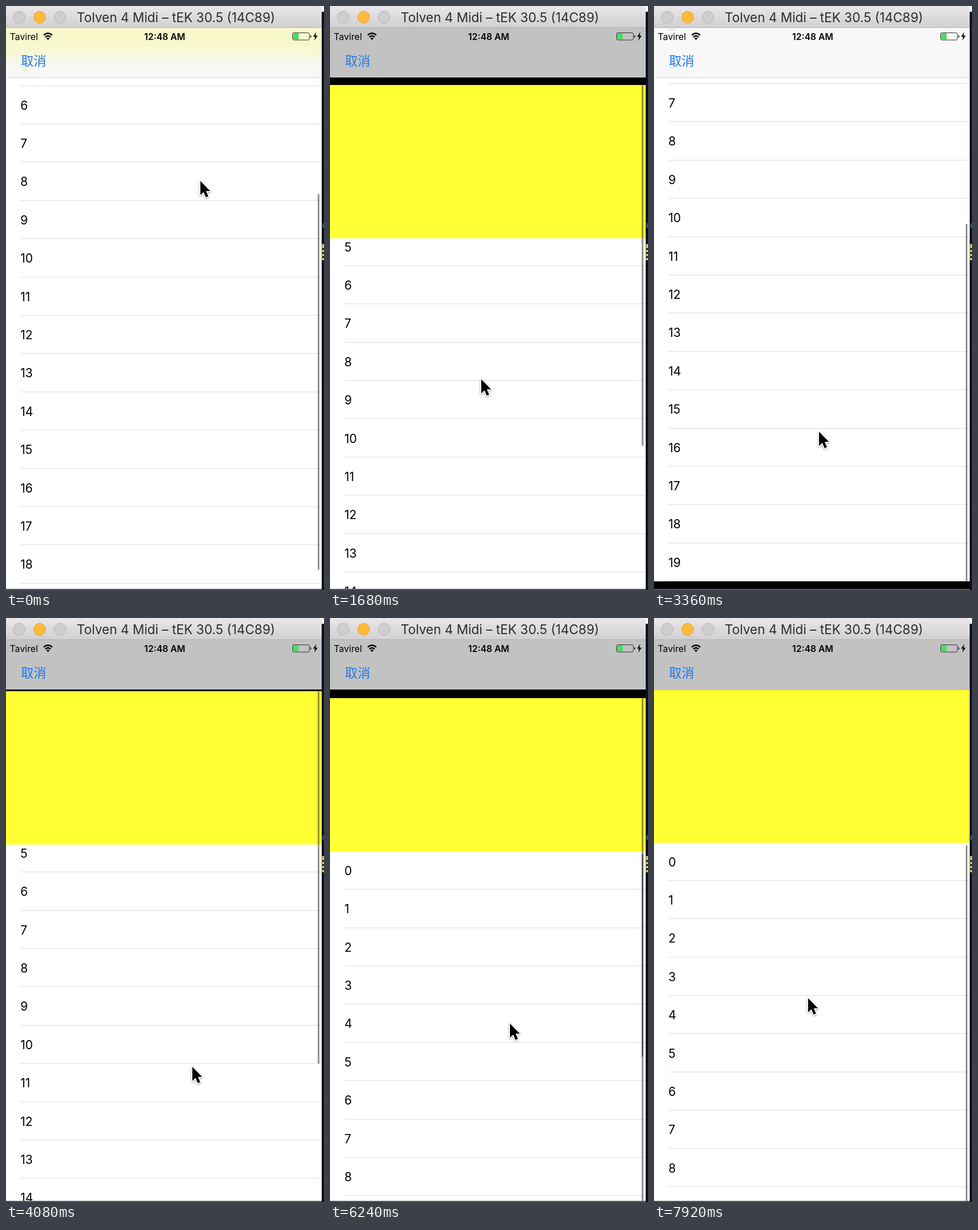
Write an HTML page that moves like this. It is 553 by 1013 pixels and loops after 8000 ms.

```html
<!DOCTYPE html>
<html lang="zh">
<head>
<meta charset="utf-8">
<title>Nested scrolling list</title>
<style>
  html, body { margin: 0; width: 553px; height: 1013px; overflow: hidden; background: #0c101c; }
  body { position: relative; font-family: Inter, "Open Sans", sans-serif; color: #000; }
  div, svg { position: absolute; }
  #screen { left: 0; top: 38px; width: 549px; height: 973px; overflow: hidden; background: #000; }
  #world { left: 0; width: 549px; }
  #banner { left: 0; top: 0; width: 549px; height: 265.5px; background: #ffff33; }
  #list { left: 0; top: 265.5px; width: 549px; overflow: hidden; background: #fff; }
  #rows { left: 0; width: 549px; }
  .row { left: 25px; width: 524px; height: 66.4px; line-height: 68px; font-size: 21px; }
  .row::after { content: ""; position: absolute; left: 0; right: 0; bottom: 0; height: 1px; background: #dedede; }
  .bar { left: 541.5px; width: 3px; border-radius: 2px; background: rgba(0, 0, 0, .42); }
  #nav { left: 0; top: 0; width: 549px; height: 86px; background: rgba(246, 246, 246, .788);
    -webkit-backdrop-filter: blur(16px); backdrop-filter: blur(16px); }
  #hair { left: 0; top: 86px; width: 549px; height: 1px; background: rgba(0, 0, 0, .18); }
  #title { left: 0; top: 0; width: 549px; height: 37px; border-bottom: 1px solid #b4b2b4;
    border-radius: 0 5px 0 0; background: linear-gradient(#e9e7e9, #d1cfd1); }
  #corner { left: 540px; top: 0; width: 13px; height: 10px; background: #f4f4f4; }
  #edge { left: 0; top: 1011px; width: 549px; height: 2px; background: #5a5a5a; }
  svg { left: 0; top: 0; }
</style>
</head>
<body>
<div id="screen">
  <div id="world">
    <div id="banner"></div>
    <div id="list"><div id="rows"></div></div>
  </div>
  <div class="bar" id="outer"></div>
  <div class="bar" id="inner"></div>
  <div id="nav"></div>
  <div id="hair"></div>
</div>
<div id="corner"></div>
<div id="title"></div>
<div id="edge"></div>

<svg width="553" height="1013" viewBox="0 0 553 1013">
  <g stroke-width="1">
    <circle cx="23" cy="19.5" r="10.3" fill="#cfcdcf" stroke="#b5b3b5"/>
    <circle cx="58.5" cy="19.5" r="10.3" fill="#fdba3c" stroke="#e2a233"/>
    <circle cx="94" cy="19.5" r="10.3" fill="#cfcdcf" stroke="#b5b3b5"/>
  </g>
  <text x="295.5" y="28" font-size="22.4" fill="#2e2c2e" text-anchor="middle">Tolven 4 Midi – tEK 30.5 (14C89)</text>
  <text x="6.5" y="58.5" font-size="15.8">Tavirel</text>
  <text x="276" y="58.5" font-size="15.6" font-weight="600" text-anchor="middle">12:48 AM</text>
  <text x="26" y="103" font-size="22" fill="#2277ea" font-family="'Noto Sans CJK SC', 'Noto Sans CJK', 'Noto Sans CJK JP', sans-serif">取消</text>

  <g fill="none" stroke="#000" stroke-width="2.3">
    <path d="M65.6 50.6Q73 43.8 80.4 50.6"/>
    <path d="M68.4 53.9Q73 49.6 77.6 53.9"/>
  </g>
  <path d="M70.2 56Q73 53.4 75.8 56L73 59Z"/>

  <rect x="498.5" y="46.5" width="29" height="12.5" rx="2" fill="none" stroke="#333"/>
  <rect x="499.3" y="47.3" width="9.7" height="11" rx="1" fill="#50d866"/>
  <path d="M529 50.5q2 .3 2 2.2t-2 2.2z" fill="#222"/>
  <path d="M539.5 45L534 53.2h3.6L536 60l6-8.6h-3.8z"/>

  <rect x="550" y="377" width="3" height="8" fill="#245078"/>
  <rect x="549.5" y="413" width="3.5" height="28" fill="#d9c45c"/>
  <path d="M551.5 420v17" stroke="#151722" stroke-width="3" stroke-dasharray="3 4"/>

  <g id="cursor">
    <path d="M0 0V24.5L5.6 19.2L9.6 28.4L13.8 26.6L9.8 17.6H17.2Z" stroke="#fff" stroke-width="3.4"
      stroke-linejoin="round" style="filter: drop-shadow(0 1.5px 1.5px rgba(0,0,0,.4))"/>
    <path d="M0 0V24.5L5.6 19.2L9.6 28.4L13.8 26.6L9.8 17.6H17.2Z"/>
  </g>
</svg>

<script>
const LOOP = 8000, STEP = 120;
const ROW = 66.4, COUNT = 20, BANNER = 265.5, MAX_INNER = 350;
const TOP = 124, BOTTOM = 1012, SCREEN_Y = 38;
const LIST_H = ROW * COUNT, INNER_VIEW = LIST_H - MAX_INNER;
const $ = id => document.getElementById(id);

// time, banner top, inner scroll, cursor x, cursor y
const poses = [
  [0, -175.4, 350, 337, 302],
  [600, 188, 350, 300, 619],
  [960, 204, 350, 288, 652],
  [1320, 196, 350, 270, 662],
  [1680, 137, 350, 262, 646],
  [1920, 124, 350, 264, 690],
  [2520, -140, 350, 280, 520],
  [2880, -228, 350, 284, 560],
  [3360, -245.4, 350, 286, 737],
  [3600, -215, 350, 304, 560],
  [4080, 127.4, 350, 323, 777],
  [4560, 124, 350, 320, 760],
  [5040, 124, 350, 320, 560],
  [5760, 124, 40, 314, 650],
  [6000, 134, 0, 313, 690],
  [6240, 139.4, 0, 312, 702],
  [6600, 124, 0, 300, 700],
  [7140, 124, 150, 280, 560],
  [7800, 124, 0, 268, 655],
  [7920, 124, 0, 267, 658]
];

const clamp = v => Math.max(0, Math.min(1, v));
const ramp = (t, from, to) => clamp((t - from) / (to - from));

function poseAt(t) {
  let i = 0;
  while (i < poses.length - 2 && t >= poses[i + 1][0]) i++;
  const a = poses[i], b = poses[i + 1];
  if (a[0] === 4560) return a;
  const u = ramp(t, a[0], b[0]), e = u * u * (3 - 2 * u);
  return a.map((v, k) => v + (b[k] - v) * e);
}

function placeBar(el, top, length, alpha) {
  el.style.top = top - SCREEN_Y + "px";
  el.style.height = length + "px";
  el.style.opacity = alpha;
}

for (let i = 0; i < COUNT; i++) {
  const row = document.createElement("div");
  row.className = "row";
  row.textContent = i;
  row.style.top = i * ROW + "px";
  $("rows").append(row);
}

function draw(t) {
  const [, y, inner, cx, cy] = poseAt(t);
  const listY = y + BANNER, end = listY + LIST_H - inner;
  $("world").style.top = y - SCREEN_Y + "px";
  $("list").style.height = LIST_H - inner + "px";
  $("rows").style.top = -inner + "px";

  // The outer bar shrinks against either end while overscrolled.
  const pull = Math.max(0, y - TOP), over = Math.max(0, BOTTOM - end);
  const length = 652 - 2 * pull - 2.3 * over;
  const top = pull ? y : over ? end - length : TOP + 2 + (TOP - y) * 0.667;
  const outerAlpha = t < 5040 ? 1 - ramp(t, 4200, 4560)
    : ramp(t, 5640, 5880) * (1 - ramp(t, 6600, 6960));
  placeBar($("outer"), top, length, outerAlpha);

  const ratio = INNER_VIEW / LIST_H;
  placeBar($("inner"), listY + 4 + inner * ratio, INNER_VIEW * ratio - 8, ramp(t, 4920, 5040));
  $("cursor").setAttribute("transform", `translate(${cx + 1} ${cy + 1.5})`);
}

const start = performance.now();
function tick() {
  const t = (performance.now() - start) % LOOP;
  draw(Math.floor(t / STEP) * STEP);
  requestAnimationFrame(tick);
}
tick();
</script>
</body>
</html>
```
